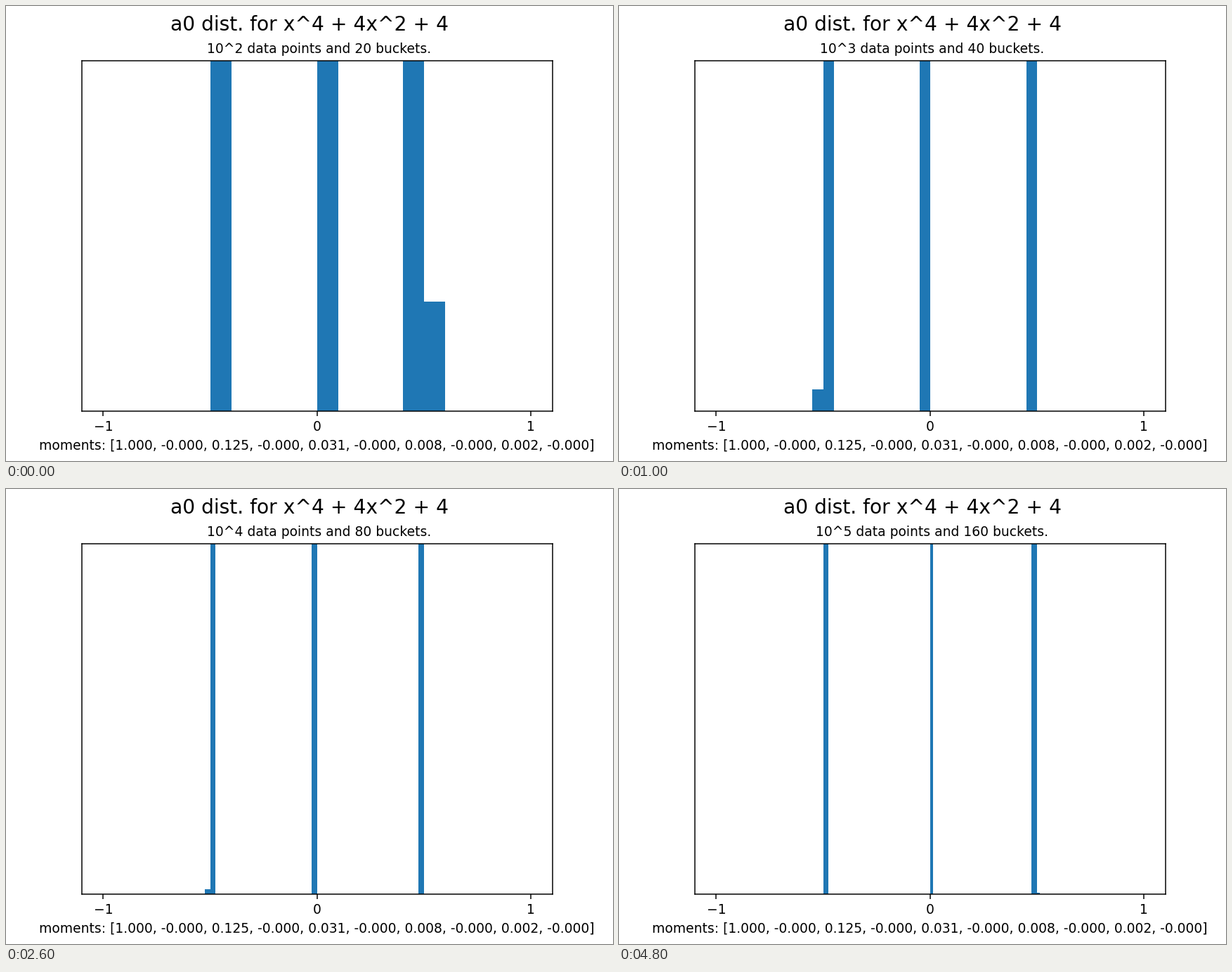
A matplotlib script for the animation above (6 s loop, 864 by 648 pixels).

```python
import matplotlib.pyplot as plt
from matplotlib.animation import FuncAnimation

plt.rcParams["font.family"] = "DejaVu Sans"

FULL = 2  # taller than the axes, so the bar is cut off at the top
LAST = 3

# Bins per step: left edges (in units of the bin width) of the tall bars, then the short one
TALL_BINS = [(-5, 0, 4), (-10, -1, 9), (-20, -1, 19), (-40, -39, 0, 38, 39)]
SHORT_BIN = [5, -11, -21, 40]

fig = plt.figure(figsize=(6.4, 4.8), dpi=135)
ax = fig.add_subplot()
fig.suptitle("a0 dist. for x^4 + 4x^2 + 4", fontsize=15)
ax.set_xlim(-1.1, 1.1)
ax.set_ylim(0, 1)
ax.set_xticks([-1, 0, 1], ["\u22121", "0", "1"])
ax.set_yticks([])

moments = [1, -0.0, 0.125, -0.0, 0.03125, -0.0, 0.0078125, -0.0, 0.001953125, -0.0]
ax.set_xlabel("moments: [" + ", ".join(f"{m:.3f}" for m in moments) + "]", fontsize=10)


def draw(frame):
    step = min(frame, LAST)
    buckets = 20 * 2**step
    width = 2 / buckets
    bins = [*TALL_BINS[step], SHORT_BIN[step]]
    heights = [FULL] * len(TALL_BINS[step]) + [0.3125 / 5**step]

    for bar in list(ax.patches):
        bar.remove()
    ax.bar([b * width for b in bins], heights, width, align="edge", color="#1f77b4")
    ax.set_xlim(-1.1, 1.1)
    ax.set_ylim(0, 1)
    ax.set_title(f" 10^{step + 2} data points and {buckets} buckets.", fontsize=10)
    return ax.patches


anim = FuncAnimation(fig, draw, frames=6, interval=1000, repeat=True, repeat_delay=0, blit=False)
plt.show()
```
